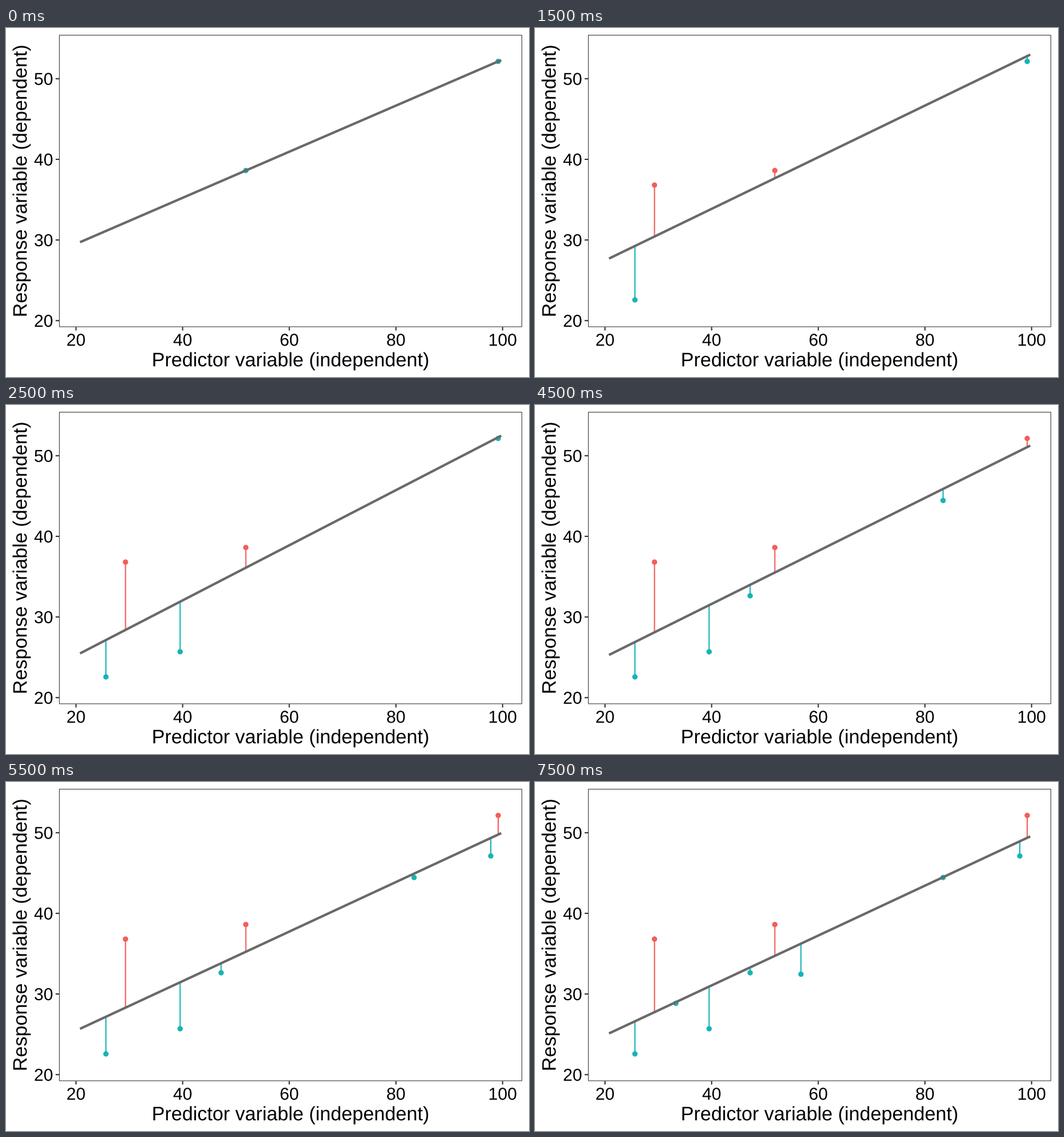
These frames come from a looping animation (917 by 611 pixels, 8000 ms). A matplotlib script:

```python
import numpy as np
import matplotlib.pyplot as plt
from matplotlib.animation import FuncAnimation
from matplotlib.patches import PathPatch, Rectangle
from matplotlib.textpath import TextPath
from matplotlib.transforms import Affine2D

W, H, DPI = 917, 611, 100
PX = 72 / DPI  # points per pixel
RED, TEAL, GREY, DARK = "#F35E5A", "#17B3B7", "#696969", "#333333"
LEFT, RIGHT, TOP, BOTTOM = 93, 905, 12, 523.6
LABEL, TITLE = 30.2, 34.2
THIN, THICK, DOT = 2.13, 4.27, 9.4

# Observations in stage pixels, in the order they join the fit.
POINTS = np.array([
    (420.5, 249.5), (863, 58.5), (209.5, 275), (175.2, 476), (305.3, 432),
    (715.5, 167.2), (377.2, 334), (850, 129.5), (247, 387.5), (466.3, 336.5),
])
LINE_X = np.array([129.8, 868.3])

fig = plt.figure(figsize=(W / 100, H / 100), dpi=DPI, facecolor="white")
ax = fig.add_axes((0, 0, 1, 1))
ax.set(xlim=(0, W), ylim=(H, 0))
ax.axis("off")


def stroke(xs, ys, width, color, z=1):
    return ax.plot(xs, ys, color=color, lw=width * PX, zorder=z, snap=False,
                   solid_capstyle="butt")[0]


def write(x, y, text, size, angle=0):
    """Set text with its pen origin at a subpixel position."""
    path = TextPath((0, 0), text, size=size, prop={"family": "Liberation Sans"})
    place = Affine2D().scale(1, -1).rotate_deg(-angle).translate(x, y)
    ax.add_patch(PathPatch(place.transform_path(path), fc="black", lw=0,
                           snap=False))


def draw_axes():
    # The panel clips the border, so only its inner half shows.
    edge = THIN / 2
    ax.add_patch(Rectangle((LEFT + edge / 2, TOP + edge / 2),
                           RIGHT - LEFT - edge, BOTTOM - TOP - edge, fill=False,
                           ec=DARK, lw=edge * PX, snap=False, zorder=5))
    digit = 0.556 * LABEL
    for value in range(20, 101, 20):
        x = 122.7 + (value - 20) * 9.35
        stroke([x, x], [BOTTOM, BOTTOM + 6], THIN, DARK)
        write(x - digit * len(str(value)) / 2, 556.3, str(value), LABEL)
    for value in range(20, 51, 10):
        y = 512.3 - (value - 20) * 14.117
        stroke([LEFT - 6, LEFT], [y, y], THIN, DARK)
        write(82.6 - 2 * digit, y + 10.8, str(value), LABEL)
    write(255.6, 592.3, "Predictor variable (independent)", TITLE)
    write(36.3, 506.4, "Response variable (dependent)", TITLE, angle=90)


draw_axes()
fit_line = stroke([], [], THICK, GREY, z=4)
residuals = ax.vlines([], [], [], lw=THIN * PX, zorder=2, snap=False)
dots = ax.scatter([], [], s=(DOT * PX) ** 2, linewidths=0, zorder=3)


def update(i):
    x, y = POINTS[:2 + (i + 1) // 2].T
    slope, intercept = np.polyfit(x, y, 1)
    fitted = slope * x + intercept
    # Stage y grows downwards, so smaller means above the line.
    colors = np.where(y < fitted - 0.1, RED, TEAL)

    fit_line.set_data(LINE_X, slope * LINE_X + intercept)
    residuals.set_segments([[(a, b), (a, c)] for a, b, c in zip(x, y, fitted)])
    residuals.set_color(colors)
    dots.set_offsets(np.column_stack([x, y]))
    dots.set_facecolor(colors)
    return fit_line, residuals, dots


anim = FuncAnimation(fig, update, frames=16, interval=500, repeat=True,
                     repeat_delay=0, blit=False)
plt.show()
```
